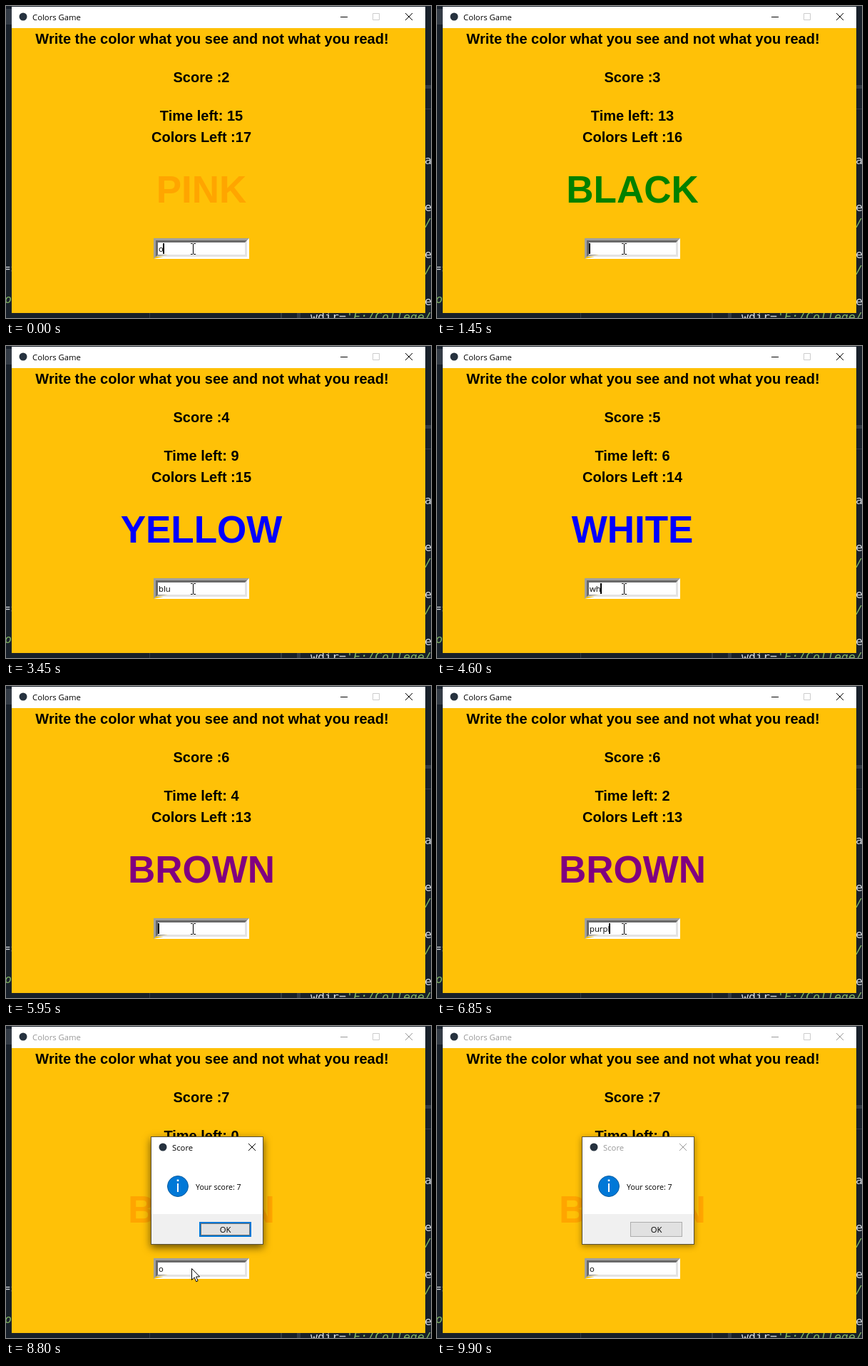
Animation, 596 px wide and 438 px high, one loop 9.95 s. Source, as an HTML page:

```html
<!DOCTYPE html>
<html lang="en">
<head>
<meta charset="utf-8">
<title>Colors Game</title>
<style>
  html, body { margin: 0; width: 100%; height: 100%; overflow: hidden; background: #18202a; }
  svg { display: block; }
  text { white-space: pre; }
  .code { font: 16.6px "DejaVu Sans Mono", monospace; fill: #d5d9de; }
  .string { fill: #83b763; font-style: italic; }
  .label { font: bold 20px "Liberation Sans", Arial, sans-serif; text-anchor: middle; }
  .word { font: bold 53px "Liberation Sans", Arial, sans-serif; text-anchor: middle; }
  .ui { font: 11.3px "Open Sans", sans-serif; }
  .small { font-size: 10.6px; }
  .line { fill: none; stroke: #000; }
  .inactive .line { stroke: #999; }
  .inactive .ui.title { fill: #999; }
  #panel { filter: drop-shadow(0 4px 6px #0009); }
  .inactive #panel { filter: drop-shadow(0 2px 4px #0006); }
  .inactive #focus { display: none; }
</style>
</head>
<body>
<svg width="596" height="438" viewBox="0 0 596 438">
  <!-- editor behind the window -->
  <rect width="596" height="438" fill="#18202a"/>
  <path fill="#333b45" d="M0 4h8v22h-8zM588 111h8v5h-8zM588 144h8v1h-8zM201 431h1v7h-1zM385 431h2v7h-2zM408 431h5v7h-5z"/>
  <g class="code">
    <text x="-4" y="373">=s</text>
    <text x="-2" y="417" class="string">or</text>
    <text x="587" y="222">a</text>
    <text x="587" y="288">e</text>
    <text x="587" y="310" class="string">/</text>
    <text x="587" y="354">e</text>
    <text x="587" y="376" class="string">/</text>
    <text x="587" y="420">e</text>
    <text x="427" y="442">wdir=<tspan class="string">'E:/College/</tspan></text>
  </g>

  <g id="game">
    <rect x="8" y="1" width="580" height="30" fill="#fff"/>
    <rect x="8" y="31" width="580" height="400" fill="#ffc107"/>
    <circle cx="24" cy="15" r="5.5" fill="#26323f"/>
    <text x="37" y="20" class="ui title">Colors Game</text>
    <path class="line" d="M469 15.5h10M560 10l10 10m0-10l-10 10"/>
    <path fill="none" stroke="#ccc" d="M514.500 10.500h9v9h-9z"/>

    <text x="289" y="53" class="label">Write the color what you see and not what you read!</text>
    <text x="274" y="107" class="label" id="score"></text>
    <text x="274" y="161" class="label" id="time"></text>
    <text x="274" y="191" class="label" id="left"></text>
    <text x="274" y="276" class="word" id="word"></text>

    <!-- sunken entry -->
    <path fill="#fff" d="M207 355h134v-29z"/>
    <path fill="#a0a0a0" d="M207 355v-29h134l-3 3-128 23z"/>
    <path fill="#e3e3e3" d="M210 352h128v-23z"/>
    <path fill="#696969" d="M210 352v-23h128l-3 3-122 17z"/>
    <rect x="213" y="332" width="122" height="17" fill="#fff"/>
    <text x="214" y="345" class="ui" id="entry"></text>
    <rect y="333" width="2" height="15" id="caret"/>
  </g>

  <g id="dialog">
    <rect id="panel" x="203.500" y="155.500" width="157" height="151" fill="#fff" stroke="#5b5238"/>
    <rect x="204" y="264" width="156" height="42" fill="#f0f0f0"/>
    <circle cx="220" cy="170" r="5.500" fill="#26323f"/>
    <text x="233" y="175" class="ui title">Score</text>
    <path class="line" d="M340 165l10 10m0-10l-10 10"/>
    <circle cx="241" cy="225" r="14.500" fill="#0078d7" stroke="#005a9e"/>
    <path fill="#fff" d="M240 221h2v12h-2zM239.700 215.500h2.600v2.600h-2.600z"/>
    <text x="266" y="230" class="ui small">Your score: 7</text>
    <rect x="271.500" y="275.500" width="72" height="20" fill="#e1e1e1" stroke="#adadad"/>
    <g id="focus" fill="none">
      <rect x="272" y="276" width="71" height="19" stroke="#0078d7" stroke-width="2"/>
      <rect x="273.500" y="277.500" width="68" height="16" stroke="#000" stroke-dasharray="1"/>
    </g>
    <text x="307.500" y="290" class="ui" text-anchor="middle">OK</text>
  </g>

  <path id="beam" fill="none" stroke="#000" d="M259 333.500h2.500l1 1 1-1h2.500M262.500 334v14M259 348.500h2.500l1-1 1 1h2.500"/>
  <path id="arrow" fill="#fff" stroke="#000" d="M.5.5v16l3.700-3.500 2.500 5.800 2.400-1-2.500-5.800h5z"/>
</svg>
<script>
const LOOP = 9950, TICK = 505, DIALOG = 16 * TICK, BLUR = 9500;

// start, word, ink, keys ("<" is backspace), first key time, key interval
const rounds = [
  [0, 'PINK', 'orange', 'orange', -50, 150],
  [900, 'BLACK', 'green', 'green', 1500, 200],
  [2600, 'YELLOW', 'blue', 'blue', 3050, 180],
  [3950, 'WHITE', 'blue', 'wh<<blue', 4400, 140],
  [5550, 'BROWN', 'purple', 'purple', 6050, 170],
  [7150, 'BROWN', 'orange', 'o', 7900, 150]
];

const $ = id => document.getElementById(id);
const show = (id, on) => $(id).style.display = on ? '' : 'none';

function typed(keys, first, interval, t) {
  const count = Math.max(0, Math.floor((t - first) / interval) + 1);
  return [...keys.slice(0, count)].reduce((s, k) => k === '<' ? s.slice(0, -1) : s + k, '');
}

function draw(t) {
  const index = rounds.findLastIndex(r => r[0] <= t);
  const [, word, ink, keys, first, interval] = rounds[index];
  const over = t >= DIALOG;

  $('score').textContent = 'Score :' + (2 + index);
  $('time').textContent = 'Time left: ' + Math.max(0, 15 - Math.floor(t / TICK));
  $('left').textContent = 'Colors Left :' + (17 - index);
  $('word').textContent = word;
  $('word').setAttribute('fill', ink);

  const value = typed(keys, first, interval, t);
  $('entry').textContent = value;
  $('caret').setAttribute('x', Math.round(213 + (value && $('entry').getComputedTextLength())));
  show('caret', !over && t % 450 < 300);

  show('dialog', over);
  $('game').classList.toggle('inactive', over);
  $('dialog').classList.toggle('inactive', t >= BLUR);

  // the pointer slides out at the bottom once the score is shown
  const p = Math.min(1, Math.max(0, (t - 9050) / 400));
  const ease = p * p * (3 - 2 * p);
  show('beam', !over);
  show('arrow', over && p < 1);
  $('arrow').setAttribute('transform', `translate(${260 + 40 * ease} ${340 + 105 * ease})`);
}

function frame() {
  draw(performance.now() % LOOP);
  requestAnimationFrame(frame);
}
frame();
</script>
</body>
</html>
```
